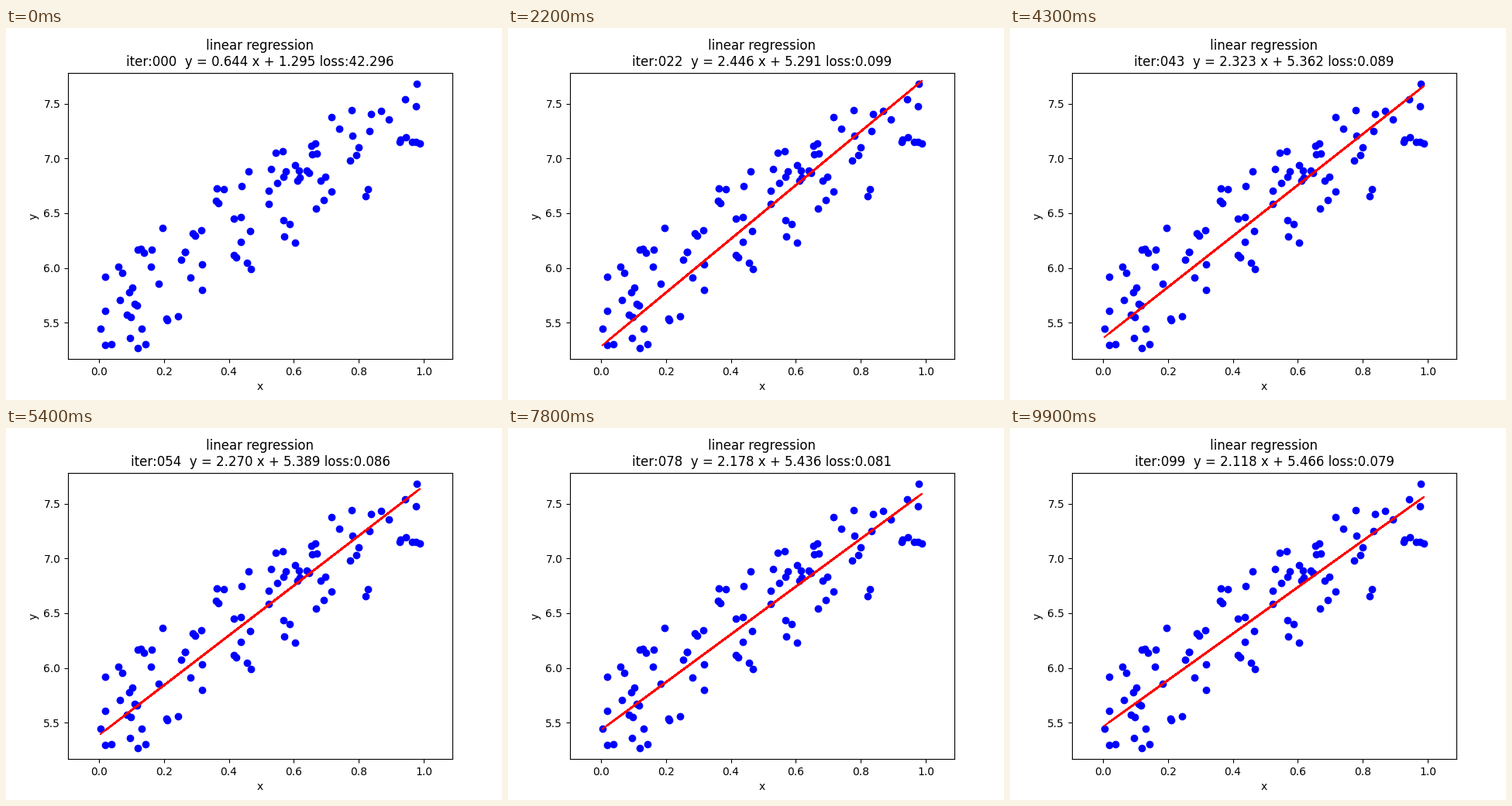
A matplotlib script that plays this animation: 640x480 px, repeating every 10000 ms.

```python
import numpy as np
import matplotlib.pyplot as plt
from matplotlib.animation import FuncAnimation

STEPS = 100
RATE = 0.1
PAD = 0.1

np.random.seed(0)
x = np.random.rand(100)
y = 5 + 2 * x + np.random.rand(100)


def descend():
    """Fit y = w x + b; keep each step's prediction, new parameters and loss."""
    w = b = 0.0
    history = []
    for _ in range(STEPS):
        pred = w * x + b
        err = pred - y
        w -= RATE * 2 * np.mean(err * x)
        b -= RATE * 2 * np.mean(err)
        history.append((pred, w, b, np.mean(err ** 2)))
    return history


history = descend()

fig, ax = plt.subplots(figsize=(6.4, 4.8), dpi=100)
ax.plot(x, y, 'bo')
line, = ax.plot([], [], 'r')
ax.set_xlim(x.min() - PAD, x.max() + PAD)
ax.set_ylim(y.min() - PAD, y.max() + PAD)
ax.set_xlabel('x')
ax.set_ylabel('y')
title = ax.set_title('')


def update(i):
    pred, w, b, loss = history[i]
    line.set_data(x, pred)
    title.set_text('linear regression\n'
                   f'iter:{i:03d}  y = {w:.3f} x + {b:.3f} loss:{loss:.3f}')
    return line, title


anim = FuncAnimation(fig, update, frames=STEPS, interval=100,
                     repeat=True, repeat_delay=0, blit=False)
plt.show()
```
